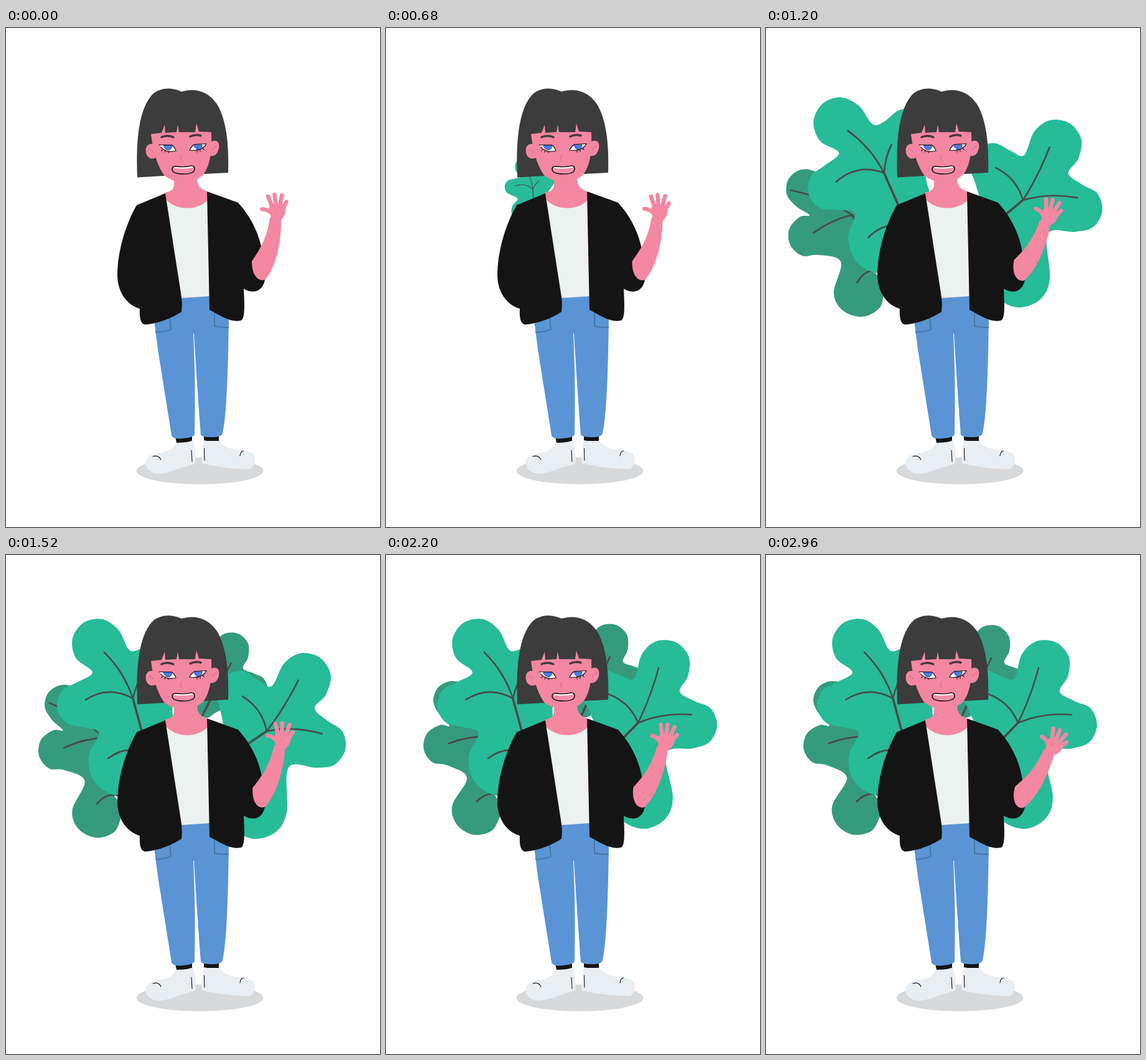
An HTML page that plays this animation: 601x800 px, repeating every 3000 ms.

```html
<!DOCTYPE html>
<html lang="en">
<head>
<meta charset="utf-8">
<title>Waving girl</title>
<style>
  html, body { margin: 0; width: 100%; height: 100%; overflow: hidden; background: #fff; }
  svg { display: block; width: 601px; height: 800px; }
  .skin { fill: #f487a2; }
  .hair { fill: #3c3c3c; }
  .coat { fill: #141414; }
  .shoe { fill: #e9eef3; }
  .line { fill: none; stroke: #141414; stroke-width: 1.1; stroke-linecap: round; }
  .vein { fill: none; stroke: #4a4a4a; stroke-width: 2.6; stroke-linecap: round; }
  .seam { fill: none; stroke: #4878a8; stroke-width: 2; }
  .finger { fill: none; stroke: #f487a2; stroke-width: 6.5; stroke-linecap: round; }
</style>
</head>
<body>
<svg viewBox="0 0 601 800">
  <ellipse cx="311.5" cy="710" rx="102" ry="21.5" fill="#d8d9db"/>
  <g id="leaves"></g>

  <g id="legs">
    <path class="coat" d="M272 655 L299 653 V664 L274 665 Z M318 654 H342 V662 H318 Z"/>
    <path fill="#5a94d5" d="M238 468 L244 515 L266 653 Q268 660 284 658 Q300 657 303 652 C304 600 304 550 301 490 H302 C305 540 309 600 313 652 Q315 656 330 656 Q346 656 348 650 C355 620 357 540 358 465 L330 425 L280 428 Z"/>
    <path class="seam" d="M263 464 L265 483 Q258 487 240 488 M335 456 V478 Q345 480 358 480"/>
    <path class="shoe" d="M273 665 C268 679 252 680 236 684 C221 687 221 705 234 712 C252 720 272 706 304 699 C306 690 303 672 301 661 Q288 666 273 665 Z"/>
    <path class="shoe" d="M318 661 C316 672 314 686 315 698 C340 704 365 707 392 707 C402 702 402 687 395 681 C380 675 354 679 343 662 Q330 664 318 661 Z"/>
    <path class="line" d="M298 677 L299 695 M318.5 674 L319 693 M236 687 Q245 684 249 692 M376 686 Q377 678 382 678"/>
  </g>

  <path fill="#ecf2f0" d="M256 270 L281 433 L327 430 L324 265 Z"/>
  <path class="skin" d="M269 238 C272 256 270 261 255 264 L258 276 C275 293 308 293 324 276 L323 262 C309 257 306 250 308 235 Z"/>
  <path class="coat" d="M256 265 L210 284 C191 317 179 360 179 398 C180 425 195 444 215 450 C214 466 217 475 224 475.5 C246 474 268 464 282 455 Q284 440 281 425 Z"/>
  <path class="coat" d="M323 262 L373 280 C394 303 408 332 412 360 L416 404 C412 423 397 427 382 418 C383 440 385 468 377 469 C360 473 340 458 327 452 Z"/>

  <g id="head">
    <path class="hair" d="M211 239.5 C209 190 211 128 238 104 C256 93 270 97 282 102 C302 96 324 100 339 122 C357 152 358 198 357 232 L318 234 L300 215 L254 237 Z"/>
    <path class="skin" d="M239 187 C229 183 223 190 225 200 C227 209 234 211 241 208 Z M330 182 C339 178 344 184 342 193 C340 203 334 206 328 205 Z"/>
    <path class="skin" d="M233 170 L250 168 L255 155 L256 168 L274 167 L276 155 L278 167 L304 167 L306 153 L310 166 L330 167 C331 195 329 220 317 235 C301 251 271 250 254 236 C242 219 236 195 233 170 Z"/>
    <path fill="none" stroke="#c9688a" d="M229 195 Q235 194 236 199 M339 189 Q332 191 332 196 M283 203 Q278 211 283 213"/>
    <path fill="none" stroke="#443a40" stroke-width="3.4" stroke-linecap="round" d="M250 175 Q260 171 269 175 M296 174 Q304 170 313 172.5"/>
    <path fill="#fff" d="M247 188 H267 L273 197 Q257 200 247 188 Z M295 196 L303 187 L321 186 Q315 197 295 196 Z"/>
    <path fill="#4f7ae8" stroke="#25418c" stroke-width=".8" d="M253 188 H267 C267 198 255 198 253 188 Z M302 187 H315 C315 197 304 198 302 187 Z"/>
    <path class="line" d="M246 187.5 H266 Q271 190 273 197 Q257 201 249 191 M295 196 Q298 189 303 186.5 L322 185.5 Q316 198 295 196 M251 195 L250 197 M256 197 L255 199 M261 198 V200 M307 197 V199 M312 195.5 V198 M316 193 L318 195"/>
    <path fill="#f58ea8" stroke="#111" stroke-width="1.6" d="M267 226 Q267 221 275 222 Q287 224 298 221 Q304 221 303 227 Q302 234 285 234 Q267 234 267 226 Z"/>
    <path fill="none" stroke="#fff" stroke-width="2" d="M270 223.5 Q285 226 300 222.5"/>
  </g>

  <g id="arm" class="skin">
    <path d="M395 374 Q404 361 411 348 C418 333 422 320 424 304 L442 305 C443 346 432 386 417 403 C408 408 395 399 395 374 Z"/>
    <g id="hand">
      <path d="M424 312 Q428 302 422 294 Q422 284 428 282 L446 282 Q454 294 442 308 Z"/>
      <path class="finger" d="M426 296 Q419 290 411.5 290.5 M428 287 L421 270 M434 285 L431.5 267 M440 285 L443.5 268 M445 290 L450.5 279"/>
    </g>
  </g>
</svg>

<script>
const LOOP = 3000, STEP = 40, HOLD = 160;
const GROW = 240, LEAN = 280, SETTLE = 440;
const GREEN = '#27bb97', DARK = '#359b7c';

// A leaf turns about its root; its veins fan out from the joint.
// edge: clockwise, lobes [x, y, radius] and notches [x, y]
// veins: tips [x, y, bend]; twig: a vein from the root
const leaves = [
  {
    fill: DARK, root: [295, 300], joint: [340, 205], start: 1320, lean: -14, drift: 0,
    edge: [[300, 180, 30], [328, 150], [362, 143, 31], [383, 173], [400, 207, 26], [365, 240], [319, 236, 25]],
    veins: [[362, 165, 0.05]]
  },
  {
    fill: GREEN, root: [338, 338], joint: [405, 269], start: 840, lean: 16, drift: 43,
    edge: [[352, 222, 38], [399, 198], [448, 177, 41], [472, 219], [494, 272, 38], [450, 318], [413, 391, 48], [345, 300]],
    veins: [[438, 181, 0.05], [491, 256, -0.12], [357, 223, 0.22]]
  },
  {
    fill: DARK, root: [195, 395], joint: [166, 291], start: 720, lean: -16, drift: 15,
    edge: [[147, 408, 41], [130, 357], [93, 305, 33], [102, 274], [107, 233, 31], [150, 240], [200, 330, 50], [205, 430]],
    veins: [[101, 302, 0.1], [84, 229, 0.1]], twig: [146, 395, 0.5]
  },
  {
    fill: GREEN, root: [228, 319], joint: [204, 230], start: 580, lean: -10, drift: 15,
    edge: [[186, 332, 54], [149, 285], [118, 240, 36], [139, 188], [147, 143, 41], [198, 152], [248, 178, 42],
      [268, 240], [240, 290, 35]],
    veins: [[158, 156, 0.12], [128, 232, 0.3], [222, 188, -0.1]], twig: [164, 326, 0.3]
  }
];

// Lobes become half circles that face away from the joint
function outline({ edge, joint }) {
  return edge.flatMap(([x, y, r]) => {
    if (!r) return [[x, y]];
    const out = Math.atan2(y - joint[1], x - joint[0]);
    return [-2, -1, 0, 1, 2].map(i => {
      const a = out + i * Math.PI / 4;
      return [x + r * Math.cos(a), y + r * Math.sin(a)];
    });
  });
}

// Closed smooth curve through the points
function smooth(pts) {
  const n = pts.length, at = i => pts[(i + n) % n];
  let d = 'M' + pts[0];
  for (let i = 0; i < n; i++) {
    const [a, b, c, e] = [at(i - 1), at(i), at(i + 1), at(i + 2)];
    const p = [0, 1].map(k => b[k] + (c[k] - a[k]) / 6);
    const q = [0, 1].map(k => c[k] - (e[k] - b[k]) / 6);
    d += `C${p} ${q} ${c}`;
  }
  return d + 'Z';
}

function vein([x, y], [tx, ty, bend]) {
  const dx = tx - x, dy = ty - y;
  return `M${x} ${y}Q${x + dx / 2 - dy * bend} ${y + dy / 2 + dx * bend} ${tx} ${ty}`;
}

function add(parent, tag, attrs = {}) {
  const el = document.createElementNS('http://www.w3.org/2000/svg', tag);
  for (const k in attrs) el.setAttribute(k, attrs[k]);
  return parent.appendChild(el);
}

const holder = document.getElementById('leaves');
const arm = document.getElementById('arm');
const hand = document.getElementById('hand');

for (const leaf of leaves) {
  const { root, joint, twig } = leaf;
  // Hidden lobes may list the ring the other way, so sort points around the ring
  const ring = leaf.edge[0][1] > joint[1] || leaf.edge[0][0] < joint[0] ? outline(leaf) : outline(leaf).reverse();
  const d = leaf.veins.map(tip => vein(joint, tip)).join('') + (twig ? vein(root, twig) : '');
  leaf.el = add(holder, 'g');
  add(leaf.el, 'path', { d: smooth(ring), fill: leaf.fill });
  add(leaf.el, 'path', { d, class: 'vein' });
  add(leaf.el, 'path', { d: vein(root, [...joint, 0]), class: 'vein', style: 'stroke-width:3.6' });
}

const swing = x => (1 - Math.cos(Math.PI * x)) / 2;
const ease = x => swing(Math.min(1, Math.max(0, x)));

// Grow while tilted the other way, lean over, then settle
function moveLeaf({ el, root: [x, y], start, lean, drift }, t) {
  const age = t - start;
  const grown = ease(age / GROW);
  const sway = ease((age - GROW) / LEAN) - ease((age - GROW - LEAN) / SETTLE);
  const small = 1 - grown;
  el.style.display = grown > 0 ? '' : 'none';
  el.setAttribute('transform',
    `translate(${x + drift * small} ${y - 42 * small}) rotate(${lean * (sway - 2 * small)})` +
    `scale(${grown + 0.03 * sway}) translate(${-x} ${-y})`);
}

function draw(ms) {
  const t = Math.max(HOLD, Math.floor(ms / STEP) * STEP);
  for (const leaf of leaves) moveLeaf(leaf, t);
  const wave = swing((t - 120) / 320) - 0.038;
  arm.setAttribute('transform', `rotate(${16.2 * wave} 407 392)`);
  hand.setAttribute('transform', `rotate(${15.7 * wave} 434 306)`);
}

const start = performance.now();
function tick() {
  draw((performance.now() - start) % LOOP);
  requestAnimationFrame(tick);
}
tick();
</script>
</body>
</html>
```
